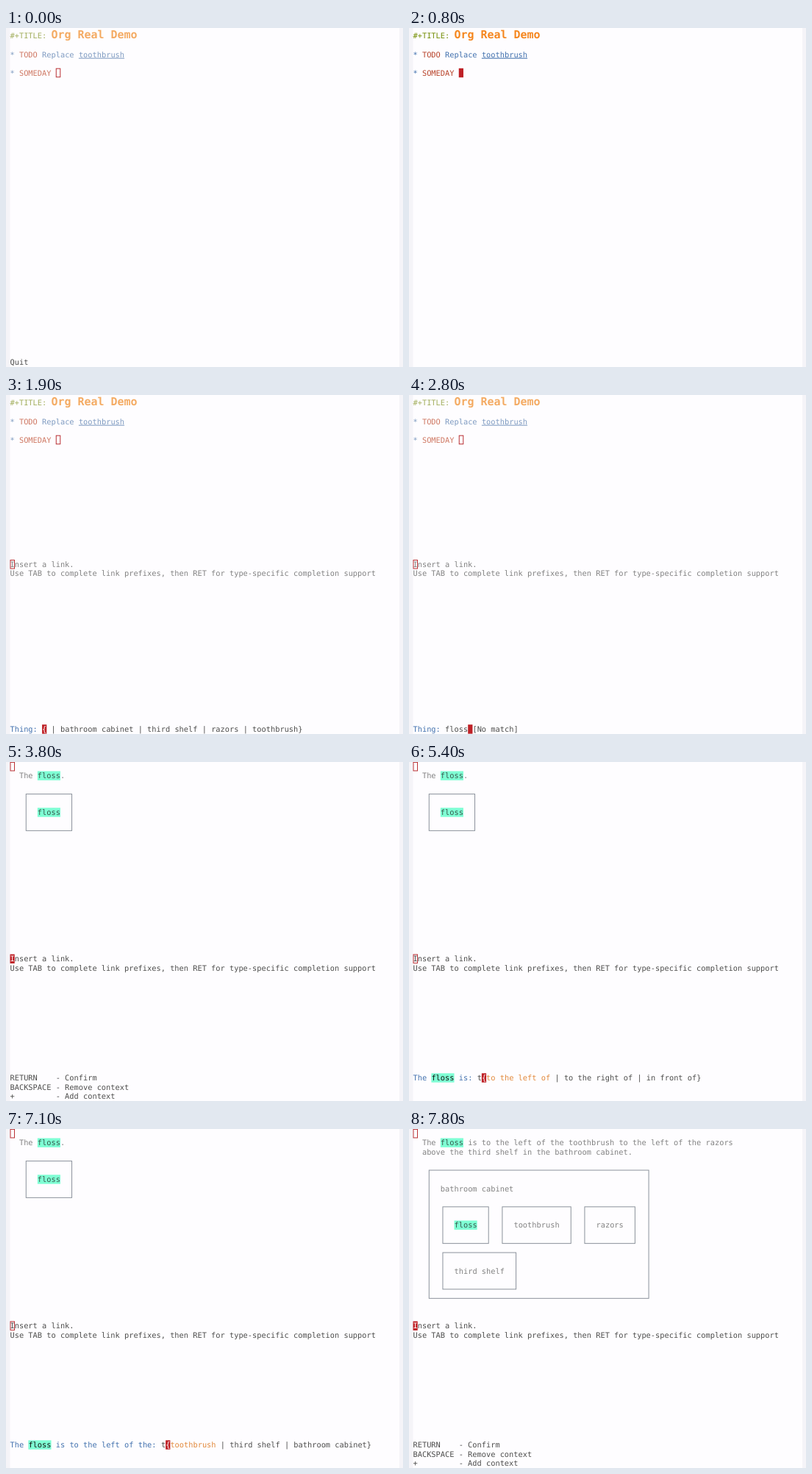
Recreate the animation shown at these times as an HTML page. Size 540 by 461 pixels, loop 8 s.

```html
<!DOCTYPE html>
<html lang="en">
<head>
<meta charset="utf-8">
<title>Org Real Demo</title>
<style>
html, body { margin: 0; width: 100%; height: 100%; overflow: hidden; background: #fefdff; }
svg { display: block; }
text { font: 10.34px "DejaVu Sans Mono", monospace; white-space: pre; text-rendering: geometricPrecision; fill: #4d4d4c; }
.dim { fill: #828282; }
.blue { fill: #4271ae; }
.blueDim { fill: #7f9bc1; }
.link { text-decoration: underline; }
.todo { fill: #b8432a; }
.todoDim { fill: #cf7863; }
.key { fill: #718c00; }
.keyDim { fill: #a2ae5c; }
.title, .titleDim { font-size: 14.95px; font-weight: bold; fill: #f5871f; }
.titleDim { fill: #f4ab63; }
.first { fill: #e2893c; }
.mark { fill: #37574e; }
.markOn { fill: #111; }
.cur { fill: #fff; }
.box { fill: none; stroke: #8b929b; }
.hollow { fill: none; stroke: #b93034; }
.wrap { fill: none; stroke: #555; stroke-width: .9; }
</style>
</head>
<body>
<svg width="540" height="461" viewBox="0 0 540 461">
  <rect width="540" height="461" fill="#fefdff"/>
  <path d="M0 0h5.5v461h-5.5zM535 0h5v461h-5z" fill="#f5f4f8"/>
  <g id="screen"></g>
</svg>
<script>
const LEFT = 5.5, CW = 6.225, RH = 12.45, COLS = 85, LOOP = 8000;
const X = col => LEFT + col * CW;
const Y = row => row * RH;

const fills = { cur: '#be2026', mark: '#7fffd4', markOn: '#7fffd4' };

function text(col, row, str, cls = '') {
  const bg = fills[cls]
    ? `<rect x="${X(col)}" y="${Y(row)}" width="${str.length * CW}" height="${RH}" fill="${fills[cls]}"/>` : '';
  return `${bg}<text x="${X(col)}" y="${Y(row) + 9.8}" class="${cls}">${str}</text>`;
}

const hollow = (col, row) =>
  `<rect class="hollow" x="${X(col) + .5}" y="${Y(row) + .4}" width="${CW - .7}" height="${RH - .9}"/>`;

// Curved arrows in both fringes where a line wraps.
function wrapMarks(row) {
  const y = Y(row) + 6.2;
  return `<path class="wrap" d="M536 ${y - 2.5}h3.5v3h-3m1.5 -1.5l-1.5 1.5l1.5 1.5h2
    M4.5 ${y + 10}h-3.5v3h3m-1.5 -1.5l1.5 1.5l-1.5 1.5h-2"/>`;
}

// Runs of [string, class] laid out on the character grid.
function line(row, runs, col = 0) {
  let out = '';
  for (let [str, cls] of runs) {
    while (str) {
      if (col >= COLS) {
        out += wrapMarks(row++);
        col = 0;
      }
      const part = str.slice(0, COLS - col);
      out += text(col, row, part, cls);
      col += part.length;
      str = str.slice(part.length);
    }
  }
  return out;
}

const box = (c1, r1, c2, r2) => `<rect class="box" x="${X(c1 + .5)}" y="${Y(r1 + .5)}"
  width="${(c2 - c1) * CW}" height="${(r2 - r1) * RH}"/>`;

function notes(on) {
  const d = on ? '' : 'Dim', row = (17.43 - RH) / RH;
  const lead = (14 - 9.8) / RH;
  return text(0, lead, '#+TITLE:', 'key' + d) +
    `<text class="title${d}" x="${X(9)}" y="14">Org Real Demo</text>` +
    line(row + 2, [['* ', 'blue' + d], ['TODO', 'todo' + d], [' Replace ', 'blue' + d], ['toothbrush', 'link blue' + d]]) +
    line(row + 4, [['* ', 'blue' + d], ['SOMEDAY', 'todo' + d]]) +
    (on ? text(10, row + 4, ' ', 'cur') : hollow(10, row + 4));
}

function help(row, cls, solid) {
  return text(0, row, 'Insert a link.', cls) +
    (solid ? text(0, row, 'I', 'cur') : hollow(0, row)) +
    text(0, row + 1, 'Use TAB to complete link prefixes, then RET for type-specific completion support', cls);
}

const floss = (col, row) => text(col, row, 'floss', 'mark');

const single = hollow(0, 0) + text(2, 1, 'The ', 'dim') + floss(6, 1) + text(11, 1, '.', 'dim') +
  box(3, 3, 13, 7) + floss(6, 5);

const cabinet = hollow(0, 0) + text(2, 1, 'The ', 'dim') + floss(6, 1) +
  text(12, 1, 'is to the left of the toothbrush to the left of the razors', 'dim') +
  text(2, 2, 'above the third shelf in the bathroom cabinet.', 'dim') +
  box(3, 4, 51, 18) + text(6, 6, 'bathroom cabinet', 'dim') +
  box(6, 8, 16, 12) + floss(9, 10) +
  box(19, 8, 34, 12) + text(22, 10, 'toothbrush', 'dim') +
  box(37, 8, 48, 12) + text(40, 10, 'razors', 'dim') +
  box(6, 13, 22, 17) + text(9, 15, 'third shelf', 'dim');

const keys = ['RETURN    - Confirm', 'BACKSPACE - Remove context', '+         - Add context']
  .map((s, i) => text(0, 34 + i, s)).join('');

// Prompts: candidate list, sole match, or a trailing message.
const ask = (row, label, typed, [first, ...rest]) => line(row, [...label, [typed], ['{', 'cur'],
  [first, 'first'], [rest.map(s => ' | ' + s).join('') + '}']]);
const sole = (row, label, typed, match) => line(row, [...label, [typed], ['[', 'cur'],
  [match, 'first'], ['] [Matched]']]);
const say = (row, label, typed, msg) => line(row, [...label, [typed], [' ', 'cur'], [msg]]);

const link = [['Link: ', 'blue']], thing = [['Thing: ', 'blue']];
const about = tail => [['The ', 'blue'], ['floss', 'markOn'], [tail, 'blue']];
const where = about(' is: '), whose = about(' is to the left of the: ');

const types = ['attachment:', 'id:', 'rmail:', 'mhe:', 'real:', 'irc:', 'info:', 'gnus:', 'docview:',
  'bibtex:', 'bbdb:', 'doi:', 'file:', 'help:', 'http:', 'https:', 'mailto:', 'news:'];
const things = ['', 'bathroom cabinet', 'third shelf', 'razors', 'toothbrush'];
const places = ['in', 'on', 'behind', 'in front of', 'above', 'below', 'to the left of', 'to the right of'];

const linkView = notes(false) + help(18, 'dim', false);
const flossView = single + help(21, '', false);
const none = '[No match]';

const steps = [
  [0, notes(false) + text(0, 36, 'Quit')],
  [400, notes(true) + text(0, 36, 'Quit')],
  [800, notes(true)],
  [1000, linkView + ask(35, link, '', types)],
  [1300, linkView + ask(35, link, 'r', ['rmail:', 'real:', 'irc:'])],
  ...['re', 'rea', 'real'].map((s, i) => [1400 + i * 100, linkView + sole(35, link, s, 'real:')]),
  [1900, linkView + ask(36, thing, '', things)],
  [2300, linkView + sole(36, thing, 'f', 'third shelf')],
  [2400, linkView + say(36, thing, 'fl', none)],
  [2500, linkView + say(36, thing, 'flo', none)],
  [2700, linkView + say(36, thing, 'flos', none)],
  [2800, linkView + say(36, thing, 'floss', none)],
  [3200, linkView + say(36, thing, 'floss', '')],
  [3600, single + help(21, '', true) + keys],
  [4600, flossView + ask(34, where, '', places)],
  [5400, flossView + ask(34, where, 't', ['to the left of', 'to the right of', 'in front of'])],
  [6000, flossView + ask(34, whose, '', things)],
  [7000, flossView + ask(34, whose, 't', ['toothbrush', 'third shelf', 'bathroom cabinet'])],
  [7600, cabinet + help(21, '', true) + keys]
];

const screen = document.getElementById('screen');
const start = performance.now();
let shown;

function draw() {
  const t = (performance.now() - start) % LOOP;
  const step = steps.findLast(s => s[0] <= t) || steps[0];
  if (step !== shown) {
    screen.innerHTML = step[1];
    shown = step;
  }
  requestAnimationFrame(draw);
}
draw();
</script>
</body>
</html>
```
